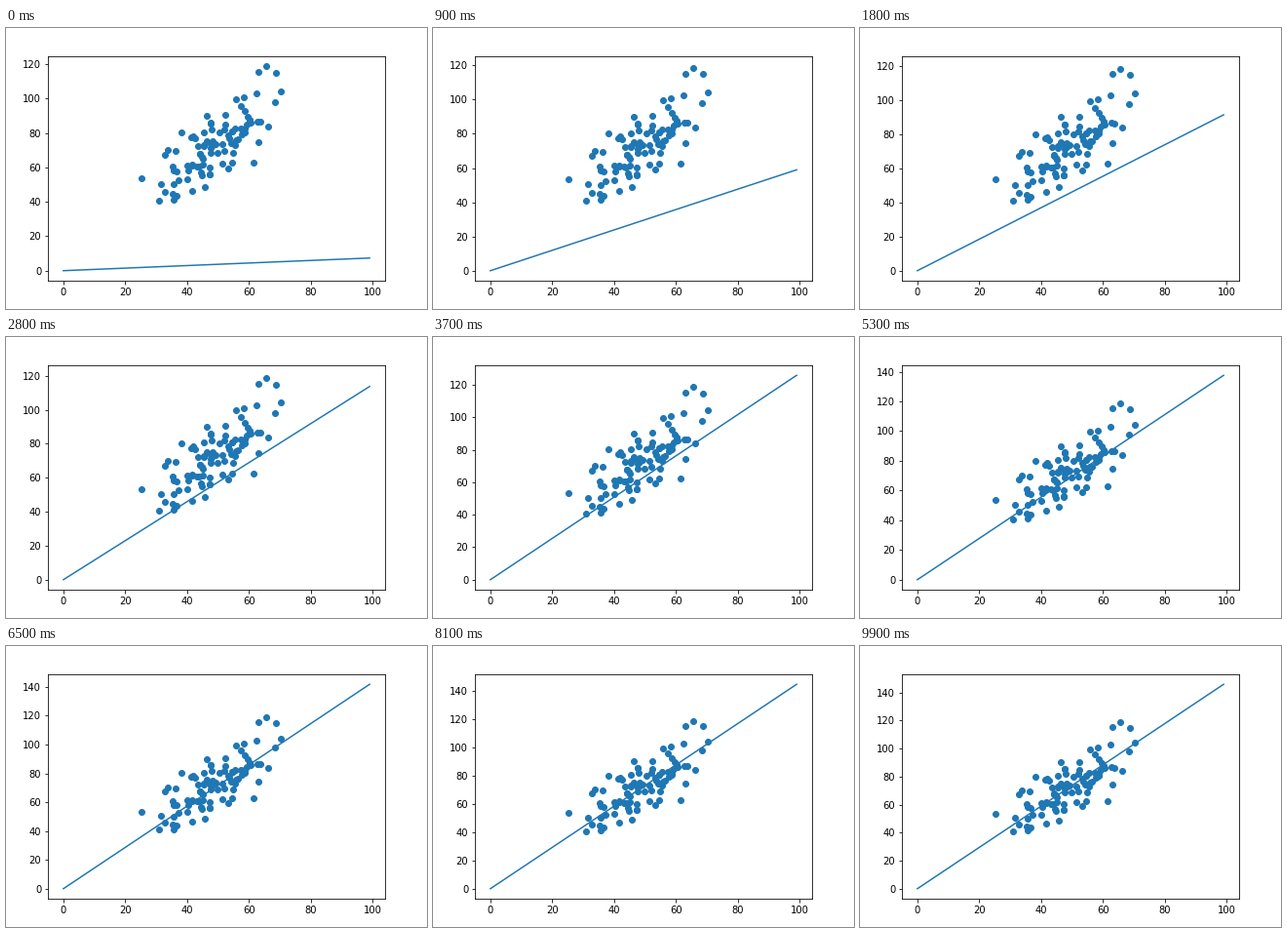
A matplotlib script that plays this animation: 432 by 288 pixels, repeating every 10000 ms.

```python
import matplotlib.pyplot as plt
import numpy as np
from matplotlib.animation import FuncAnimation

STEPS = 100
RATE = 1e-5
COUNT = 99
MEAN = np.array([49.12, 73.15])
COV = np.array([[92.2, 118.7], [118.7, 260.3]])
MARKER_RADIUS = 3

# Points that outline the cloud
RIM = np.array([
    (25.13, 53.45), (31.59, 50.39), (32.67, 45.57), (35.57, 41.41),
    (45.62, 48.85), (61.53, 62.56), (66.19, 83.88), (68.32, 97.92),
    (70.35, 104.26), (68.77, 114.85), (65.42, 118.59), (63.00, 115.24),
    (46.23, 90.12), (38.12, 80.17), (33.64, 69.90), (32.94, 67.17)])


def make_cloud(seed):
    """Rim plus random filling, with exactly the wanted mean and covariance."""
    n = COUNT - len(RIM)
    mean = (COUNT * MEAN - RIM.sum(axis=0)) / n
    second = COUNT * (COV + np.outer(MEAN, MEAN)) - RIM.T @ RIM
    shape = np.linalg.cholesky(second / n - np.outer(mean, mean))

    z = np.random.default_rng(seed).triangular(-1, 0, 1, (n, 2))
    z -= z.mean(axis=0)
    own = np.linalg.cholesky(z.T @ z / n)
    fill = z @ np.linalg.inv(own).T @ shape.T + mean
    return np.vstack([RIM, fill]).T


def descend(steps):
    """Slope and intercept after each gradient descent step."""
    m = b = 0.0
    fits = []
    for _ in range(steps):
        err = y - (m * x + b)
        m, b = m + 2 * RATE * np.mean(x * err), b + 2 * RATE * np.mean(err)
        fits.append((m, b))
    return fits


x, y = make_cloud(seed=4)
fits = descend(STEPS)
line_x = np.arange(100)

fig = plt.figure(figsize=(6, 4), dpi=72)
ax = fig.add_axes([0.1, 0.1, 0.8, 0.8])


def draw(i):
    m, b = fits[i]
    ax.clear()
    ax.plot(line_x, m * line_x + b)
    # Head room of one marker radius, at the scale that fits the line alone
    low, high = ax.get_ylim()
    room = MARKER_RADIUS * (high - low) / ax.bbox.height
    ax.scatter(x, y)
    ax.update_datalim([(x.mean(), y.max() + room)])
    ax.autoscale_view()


anim = FuncAnimation(fig, draw, frames=STEPS, interval=100,
                     init_func=lambda: None, repeat=True, repeat_delay=0)
plt.show()
```
